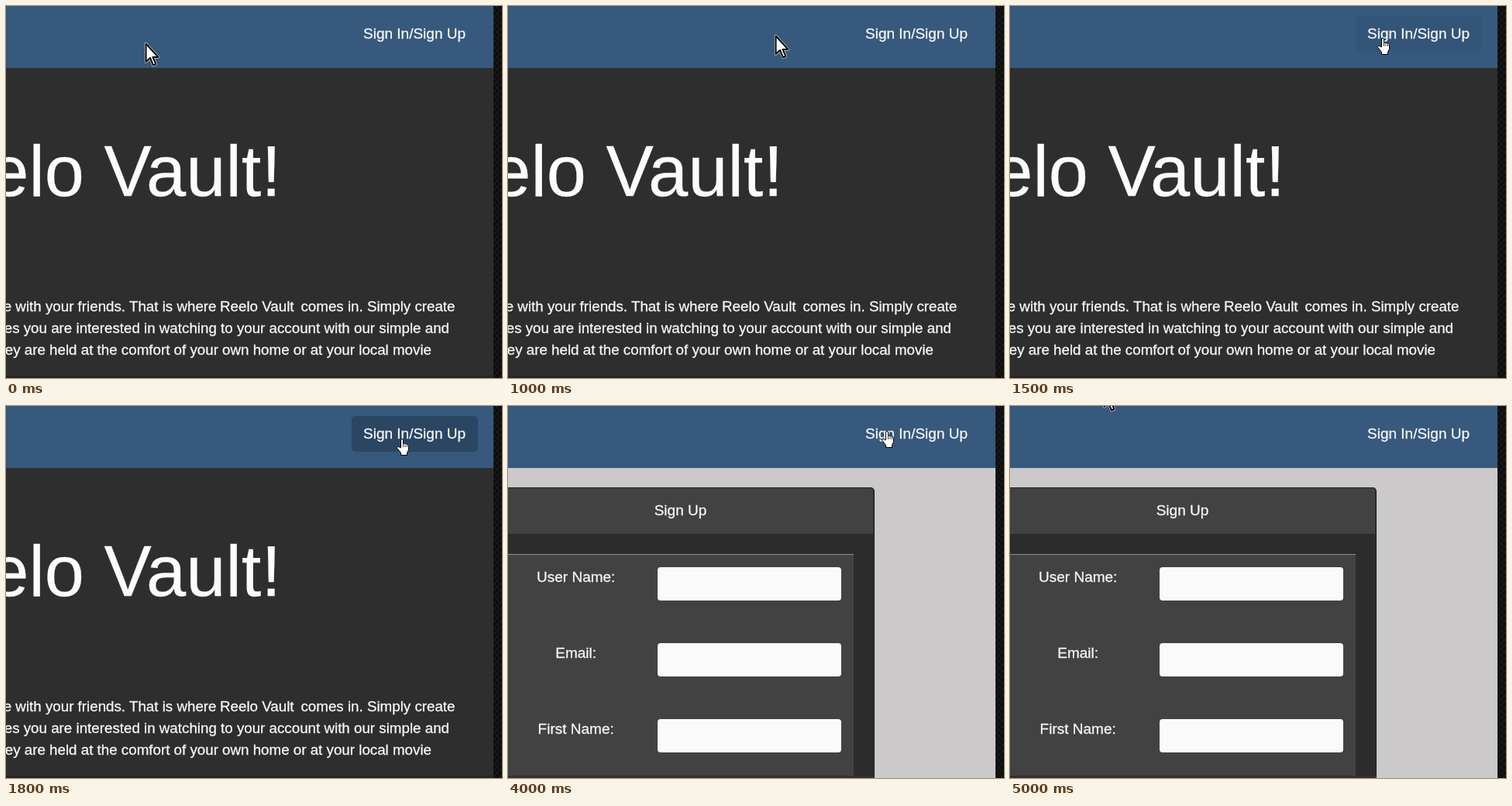
These frames come from a looping animation (640x480 px, 5100 ms). An HTML page:

```html
<!DOCTYPE html>
<html lang="en">
<meta charset="utf-8">
<style>
  html, body { margin: 0; width: 100%; height: 100%; overflow: hidden; background: #2e2e2e; }
  svg { display: block; }
  text {
    font: 19px "Liberation Sans", Arial, sans-serif;
    fill: #f7f7f7; stroke: #f7f7f7; stroke-width: .3px;
  }
  .body text { font-size: 18.75px; }
  .title { font-size: 92px; fill: #fcfcfc; }
  .end { text-anchor: end; }
  .mid { text-anchor: middle; }
</style>
<svg width="640" height="480" viewBox="0 0 640 480">
  <defs>
    <pattern id="weave" width="8" height="8" patternUnits="userSpaceOnUse">
      <rect width="8" height="8" fill="#0e0e0e"/>
      <path d="M0 0l4 4M4 8l4-4" stroke="#1e1e1e" stroke-width="1.5"/>
    </pattern>
    <path id="arrowShape" d="M.5 .5V24L6 19L10 28.5L13.5 27L9.5 18H16.5z" stroke-linejoin="round"/>
  </defs>

  <g id="home">
    <rect width="629" height="480" fill="#2e2e2e"/>
    <text class="title end" x="355" y="245">Reelo Vault!</text>
    <rect y="343" width="592" height="1" fill="#292929"/>
    <g class="body">
      <text class="end" x="271.5" y="394">movie with your friends. That is where</text>
      <text x="276" y="394">Reelo Vault</text>
      <text class="end" x="579.5" y="394">comes in. Simply create</text>
      <text class="end" x="572" y="422">movies you are interested in watching to your account with our simple and</text>
      <text class="end" x="549" y="450">they are held at the comfort of your own home or at your local movie</text>
    </g>
    <rect y="477" width="629" height="3" fill="#2b2227"/>
  </g>

  <g id="signup">
    <rect width="629" height="480" fill="#cbc9ca"/>
    <rect x="-10" y="105" width="483" height="400" rx="5" fill="#202020"/>
    <rect x="-10" y="106" width="482" height="400" rx="4" fill="#2c2c2c"/>
    <path d="M0 106H467a4 4 0 0 1 4 4V165H0z" fill="#424242"/>
    <rect y="191" width="446" height="289" fill="#424242"/>
    <rect y="191" width="446" height="1" fill="#8c8c8c"/>
    <text class="mid" x="222.5" y="141">Sign Up</text>
    <g id="fields"></g>
    <rect y="477" width="473" height="3" fill="#392c31"/>
  </g>

  <rect width="629" height="80" fill="#36597d"/>
  <rect id="button" x="446" y="13" width="163" height="46" rx="5" fill="#2a4663"/>
  <text x="461" y="42">Sign In/Sign Up</text>
  <rect x="629" width="11" height="480" fill="url(#weave)"/>

  <g id="arrow" fill="#fff">
    <use href="#arrowShape" stroke="#fff" stroke-width="3.2"/>
    <use href="#arrowShape" stroke="#000" stroke-width="2"/>
  </g>
  <g id="hand" stroke="#000" stroke-linejoin="round">
    <path d="M5.5 12V2a1.5 1.5 0 0 1 3 0V6.5a1.5 1.2 0 0 1 2.5 .5a1.4 1.2 0 0 1 2.5 .8a1.2 1.2 0 0 1 2 1.2V14.5l-2 4v3h-8V18.5L.7 12.5a1.5 1.5 0 0 1 2.3-1.7z" fill="#fff"/>
    <path d="M8.5 6.5V11M11 7V11M13.5 8V11" fill="none" stroke-width=".8"/>
  </g>
</svg>
<script>
  const LOOP = 5100, STEP = 100;
  const byId = id => document.getElementById(id);
  const show = (id, on) => byId(id).setAttribute('visibility', on ? 'visible' : 'hidden');
  const clamp01 = v => Math.min(1, Math.max(0, v));
  const easeOut = k => 1 - (1 - k) ** 2;

  byId('fields').innerHTML = ['User Name:', 'Email:', 'First Name:'].map((label, i) => `
    <text class="mid" x="87.7" y="${227 + 98 * i}">${label}</text>
    <rect x="193" y="${208 + 98 * i}" width="237" height="43" rx="4" fill="#fafafa"/>`).join('');

  // Each glide starts where the previous one ended; the pointer rests in between.
  const glides = [
    { from: 0, to: 600, x: 310, y: 39, sag: 8 },
    { from: 900, to: 1000, x: 345, y: 38 },
    { from: 1100, to: 1800, x: 509, y: 42 },
    { from: 3900, to: 4000, x: 487, y: 32 },
    { from: 4000, to: 4100, x: 487, y: -60 },
    { from: 4200, to: 4300, x: 195, y: -23 },
    { from: 4300, to: 4400, x: 170, y: -23 },
    { from: 4500, to: 5000, x: 121, y: -23 }
  ];

  function pointerAt(t) {
    let x = 180, y = 48;
    for (const glide of glides) {
      const k = easeOut(clamp01((t - glide.from) / (glide.to - glide.from)));
      x += (glide.x - x) * k;
      y += (glide.y - y) * k + (glide.sag || 0) * Math.sin(Math.PI * k);
    }
    return [Math.round(x), Math.round(y)];
  }

  function draw(now) {
    const t = Math.floor(now % LOOP / STEP) * STEP;
    const [x, y] = pointerAt(t);
    const onHome = t < 2500;
    const overLink = t >= 1500 && t < 4100;

    show('home', onHome);
    show('signup', !onHome);
    show('arrow', !overLink);
    show('hand', overLink);
    byId('button').setAttribute('opacity', onHome ? clamp01((t - 1450) / 220) : 0);
    byId('arrow').setAttribute('transform', `translate(${x} ${y})`);
    byId('hand').setAttribute('transform', `translate(${x - 5} ${y})`);
  }

  const start = performance.now();
  function tick() {
    draw(performance.now() - start);
    requestAnimationFrame(tick);
  }
  tick();
</script>
</html>
```
